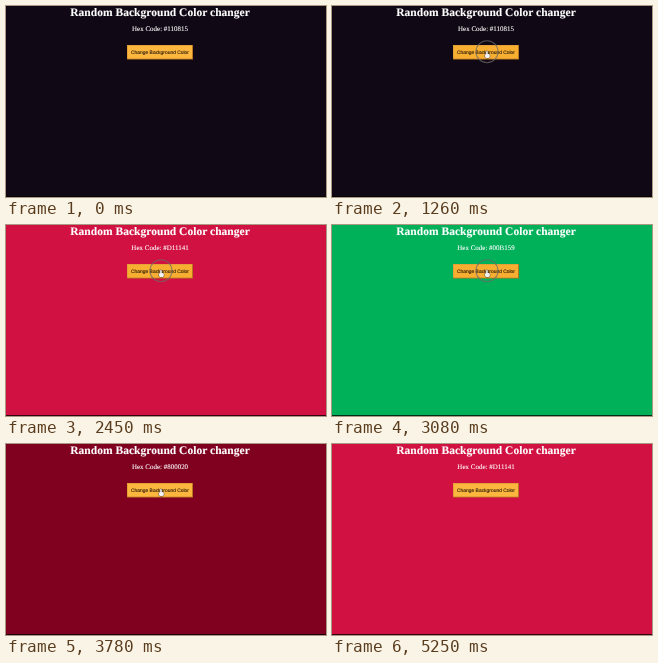
An HTML page with a canvas that plays this animation: 320 px wide and 191 px high, repeating every 5.32 s.

```html
<!DOCTYPE html>
<html lang="en">
<head>
<meta charset="utf-8">
<title>Random Background Color changer</title>
<style>
html, body { margin: 0; width: 100%; height: 100%; overflow: hidden; background: #110815; }
canvas { display: block; width: 320px; height: 191px; }
</style>
</head>
<body>
<canvas id="stage" width="320" height="191"></canvas>
<script>
const ctx = document.getElementById('stage').getContext('2d');
const LOOP = 5320, STEP = 70, PRESS = 140, CENTER = 154;
const SERIF = '"Liberation Serif", "Times New Roman", serif';
const SANS = '"Liberation Sans", Arial, sans-serif';

const FIRST_COLOR = '#110815';
const clicks = [
  { at: 1260, color: '#1BA1E2' },
  { at: 1820, color: '#D11141' },
  { at: 2450, color: '#00B159' },
  { at: 3080, color: '#800020' },
  { at: 4130, color: '#D11141' }
];

// Smooth 0..1 progress between two times
function ease(t, from, to) {
  const u = Math.min(1, Math.max(0, (t - from) / (to - from)));
  return u * u * (3 - 2 * u);
}

// Swoops in past the button, settles on it, then drops off the bottom
function pointerAt(t) {
  const enter = ease(t, 0, 600), settle = ease(t, 600, 1120), leave = ease(t, 4620, 5110);
  return {
    x: 184 - 38 * enter + 9 * settle + 15 * leave,
    y: -14 + 59 * enter + 38 * Math.sin(Math.PI * enter) + 155 * leave
  };
}

function rect(x, y, w, h, color) {
  ctx.fillStyle = color;
  ctx.fillRect(x, y, w, h);
}

// Large font scaled down keeps fractional glyph widths; a hairline adds weight
function label(text, y, size, family, color, weight = '') {
  ctx.save();
  ctx.translate(CENTER, y);
  ctx.scale(0.1, 0.1);
  ctx.font = `${weight} ${size * 10}px ${family}`;
  ctx.textRendering = 'geometricPrecision';
  ctx.textAlign = 'center';
  ctx.fillStyle = ctx.strokeStyle = color;
  ctx.lineWidth = 1.2;
  ctx.fillText(text, 0, 0);
  ctx.strokeText(text, 0, 0);
  ctx.restore();
}

function drawButton(pressed) {
  rect(121, 39, 66, 14.5, '#b9781f');
  rect(121, 39, 65, 13.5, '#e6a136');
  rect(122, 40, 64, 12.5, pressed ? '#f8ae30' : '#fdb73e');
  label('Change Background Color', 47.8, 4.92, SANS, '#2a1a0a');
}

function drawPointer({ x, y }) {
  const hovering = x > 121 && x < 187 && y > 39 && y < 53;
  ctx.beginPath();
  if (hovering) {
    ctx.roundRect(x - 0.8, y, 1.5, 5, 0.7);
    ctx.roundRect(x - 2, y + 3, 4.8, 4, 1.4);
  } else {
    [[0, 0], [0, 7], [2, 5.2], [5, 5]].forEach(([dx, dy]) => ctx.lineTo(x + dx, y + dy));
    ctx.closePath();
  }
  ctx.strokeStyle = '#444';
  ctx.lineWidth = 0.9;
  ctx.stroke();
  ctx.fillStyle = '#f2f2f2';
  ctx.fill();
}

function drawRing() {
  ctx.beginPath();
  ctx.arc(155, 45.7, 11, 0, Math.PI * 2);
  ctx.strokeStyle = 'rgba(110, 105, 103, 0.75)';
  ctx.lineWidth = 1.1;
  ctx.stroke();
}

function draw(t) {
  const color = clicks.reduce((c, click) => t >= click.at + PRESS ? click.color : c, FIRST_COLOR);
  const pressed = clicks.some(({ at }) => t >= at && t < at + PRESS);
  rect(0, 0, 320, 191, color);
  rect(0, 190, 320, 1, 'rgba(0, 0, 0, 0.75)');
  label('Random Background Color changer', 9.6, 11.55, SERIF, '#fff', 'bold');
  label('Hex Code: ' + color, 24.6, 6.98, SERIF, '#fff');
  drawButton(pressed);
  if (pressed) drawRing();
  drawPointer(pointerAt(t));
}

const start = performance.now();
function tick() {
  const t = (performance.now() - start) % LOOP;
  draw(Math.floor(t / STEP) * STEP);
  requestAnimationFrame(tick);
}
tick();
</script>
</body>
</html>
```
